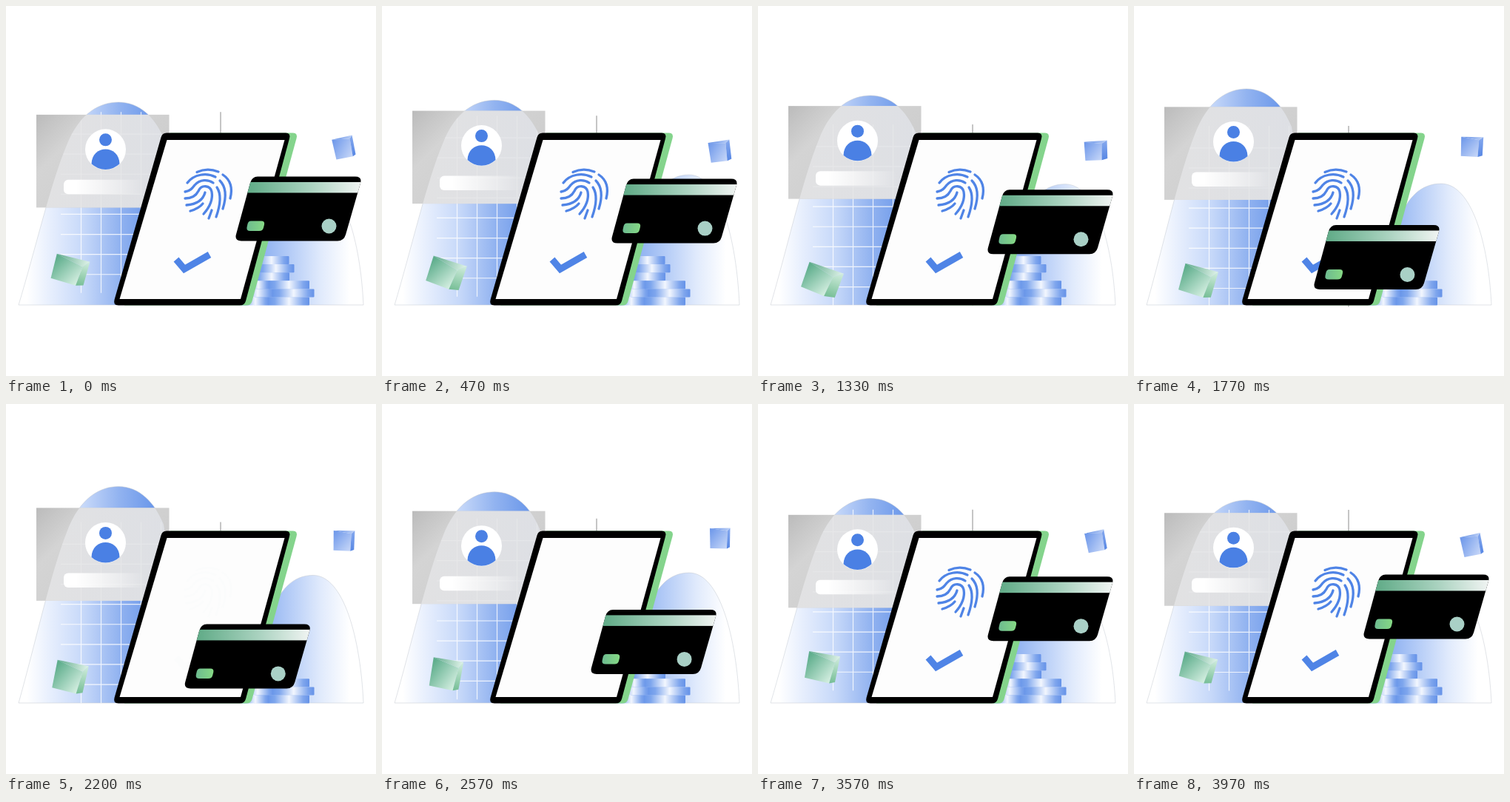
These frames come from a looping animation (500 px wide and 500 px high, 4010 ms). An HTML page:

```html
<!DOCTYPE html>
<html lang="en">
<head>
<meta charset="utf-8">
<title>Secure payment</title>
<style>
  html, body { margin: 0; width: 100%; height: 100%; overflow: hidden; background: #fff; }
  svg { display: block; width: 100vw; height: 100vh; }
  .ridge { fill: none; stroke: #4f84e6; stroke-width: 3.3; stroke-linecap: round; }
  .outline { stroke: #c3c8d0; stroke-width: .5; }
  /* The scan result clears after the tap, then comes back. */
  #scan { animation: scan 4010ms linear infinite; }
  @keyframes scan {
    0%, 52.4% { opacity: 1; }
    54.9%, 69.3% { opacity: 0; }
    72.3%, 100% { opacity: 1; }
  }
</style>
</head>
<body>
<svg viewBox="0 0 500 500">
  <defs>
    <linearGradient id="hillBlue" gradientUnits="userSpaceOnUse" x1="17" x2="200" y1="0" y2="0">
      <stop offset=".06" stop-color="#fff"/>
      <stop offset=".24" stop-color="#e6eefd"/>
      <stop offset=".48" stop-color="#c6d8f9"/>
      <stop offset=".74" stop-color="#92b3f0"/>
      <stop offset="1" stop-color="#6a97ea"/>
    </linearGradient>
    <linearGradient id="hillPale" gradientUnits="userSpaceOnUse" x1="345" x2="478" y1="0" y2="0">
      <stop offset="0" stop-color="#8db0f1"/>
      <stop offset=".3" stop-color="#b6cdf7"/>
      <stop offset=".6" stop-color="#e0eafc"/>
      <stop offset=".9" stop-color="#fff"/>
    </linearGradient>
    <linearGradient id="steel" x1="0" y1="0" x2="1" y2=".7">
      <stop offset="0" stop-color="#b8b8b8"/>
      <stop offset=".12" stop-color="#c3c3c3"/>
      <stop offset=".3" stop-color="#d2d2d2"/>
      <stop offset="1" stop-color="#cacaca"/>
    </linearGradient>
    <linearGradient id="frostFill">
      <stop offset="0" stop-color="#e3e3e4"/>
      <stop offset="1" stop-color="#dfe1e6"/>
    </linearGradient>
    <linearGradient id="barFill">
      <stop offset=".15" stop-color="#fff"/>
      <stop offset="1" stop-color="#fff" stop-opacity="0"/>
    </linearGradient>
    <linearGradient id="coinFill">
      <stop offset="0" stop-color="#6c99ea"/>
      <stop offset=".15" stop-color="#7ea6ed"/>
      <stop offset=".5" stop-color="#f2f6fe"/>
      <stop offset=".85" stop-color="#7fa6ed"/>
      <stop offset="1" stop-color="#6592e8"/>
    </linearGradient>
    <linearGradient id="stripeFill">
      <stop offset=".06" stop-color="#64ad8a"/>
      <stop offset=".55" stop-color="#a9d2bf"/>
      <stop offset="1" stop-color="#f3f5f4"/>
    </linearGradient>
    <linearGradient id="chipFill">
      <stop offset="0" stop-color="#6dbb90"/>
      <stop offset="1" stop-color="#86d985"/>
    </linearGradient>
    <linearGradient id="greenFace" x1="0" y1=".2" x2="1" y2=".8">
      <stop offset="0" stop-color="#5fae8d"/>
      <stop offset="1" stop-color="#d3eee0"/>
    </linearGradient>
    <linearGradient id="greenTop">
      <stop offset="0" stop-color="#5ea98a"/>
      <stop offset="1" stop-color="#e0f3e9"/>
    </linearGradient>
    <linearGradient id="greenSide" x1="0" y1="0" x2="0" y2="1">
      <stop offset="0" stop-color="#d3eedf"/>
      <stop offset="1" stop-color="#74bd94"/>
    </linearGradient>
    <linearGradient id="blueFace" x1="0" y1="0" x2="1" y2="1">
      <stop offset="0" stop-color="#6a95e9"/>
      <stop offset="1" stop-color="#cbdaf9"/>
    </linearGradient>
    <linearGradient id="blueTop">
      <stop offset="0" stop-color="#5a89e4"/>
      <stop offset="1" stop-color="#bfd2f7"/>
    </linearGradient>
    <linearGradient id="blueSide" x1="0" y1="0" x2="0" y2="1">
      <stop offset="0" stop-color="#86a9ee"/>
      <stop offset="1" stop-color="#5787e4"/>
    </linearGradient>
    <path id="hillShape" d="M17 404C40 328 60 240 82 188C100 143 128 130 152 130C180 130 201 150 213 178L250 404Z"/>
    <clipPath id="hillClip"><use class="hill" href="#hillShape"/></clipPath>
    <clipPath id="cardClip"><path id="cardShape" d="M30 0H162Q171.500 0 169 9L149 78.500Q146.500 87 138 87H8Q-1.500 87 1 78L20 8.500Q22.500 0 30 0Z"/></clipPath>
  </defs>

  <use class="hill outline" href="#hillShape" fill="url(#hillBlue)"/>
  <path id="mound" class="outline" d="M335 404C345 315 360 240 415 240C456 240 479 320 483 404Z" fill="url(#hillPale)"/>

  <g class="grid">
    <path id="mesh" fill="none" stroke="#fff" stroke-opacity=".75" stroke-width="1.2"/>
    <path d="M290 0V244.500" stroke="#8c8c8c"/>
  </g>

  <rect class="panel" x="41" width="179.500" height="125.500" fill="url(#steel)" opacity=".96"/>
  <g clip-path="url(#hillClip)">
    <rect class="panel" x="41" width="179.500" height="125.500" fill="url(#frostFill)" opacity=".93"/>
    <!-- The mesh shows faintly through the frosted part. -->
    <g class="grid" opacity=".25"><use href="#mesh"/></g>
  </g>
  <g class="panel">
    <rect x="78" y="88" width="110" height="19.500" rx="6" fill="url(#barFill)"/>
    <circle cx="134.500" cy="47" r="27.500" fill="#fff"/>
    <g fill="#4a80e4">
      <circle cx="134.500" cy="34" r="8.500"/>
      <path d="M115.500 66.500C116 40 153 40 153.500 66.500A27.500 27.500 0 0 1 115.500 66.500Z"/>
    </g>
  </g>

  <g id="coins" fill="url(#coinFill)"></g>

  <path d="M222 171.500H388Q394.500 171.500 392.500 179L332.500 399Q331 404.500 325 404.500H160Z" fill="#84d48c"/>
  <path d="M217 171.500H378Q385 171.500 383 179L324 398.500Q322.500 404.500 316 404.500H152Q144.500 404.500 146.500 397L209.500 177.500Q211 171.500 217 171.500Z"/>
  <path d="M217.500 181H376.500L317 396H153.500Z" fill="#fdfdfd"/>

  <g id="scan">
    <g class="ridge">
      <path d="M258 224.500Q272 218 287 224M293 228C305 236 306 248 303 260"/>
      <path d="M245 239C254 227 271 225 283 231M289 236C298 245 298 258 293 274"/>
      <path d="M242 251C249 250 252 246 255 242C262 234 273 234 280 239M285 245C291 254 290 268 284 285"/>
      <path d="M242 260C252 260 257 256 260 250C264 241 276 242 278 251C280 262 275 272 267 281"/>
      <path d="M244 269C256 268 266 263 269 252"/>
      <path d="M249 277C256 275 262 272 266 267M278 276L274 287"/>
    </g>
    <path d="M230 342.500L241 355.500L275 336" fill="none" stroke="#4f84e6" stroke-width="9"/>
  </g>

  <g id="card">
    <use href="#cardShape"/>
    <g clip-path="url(#cardClip)">
      <rect x="12" y="7.500" width="160" height="14.500" fill="url(#stripeFill)"/>
    </g>
    <path d="M21 60H35Q40 60 39 65L38 69Q37 73.500 32 73.500H20Q14.500 73.500 15.500 68.500L16.500 64Q17.500 60 21 60Z" fill="url(#chipFill)"/>
    <circle cx="126.500" cy="67" r="10" fill="#a9d0c6"/>
  </g>

  <g id="greenCube"></g>
  <g id="blueCube"></g>
</svg>

<script>
const LOOP = 4010;
const SVG = 'http://www.w3.org/2000/svg';
const byId = id => document.getElementById(id);

function add(parent, tag, attrs) {
  const el = document.createElementNS(SVG, tag);
  for (const key in attrs) el.setAttribute(key, attrs[key]);
  return parent.appendChild(el);
}

const move = (el, x, y, rest = '') =>
  el.setAttribute('transform', `translate(${x} ${y})${rest}`);

// Stretches a shape vertically from the ground line.
const stretch = (el, k) => move(el, 0, 404 * (1 - k), ` scale(1 ${k})`);

// Sine around mid that is highest in value at time peak.
const wave = (t, mid, amp, peak, period = LOOP) =>
  mid + amp * Math.cos(2 * Math.PI * (t - peak) / period);

// Smooth looping curve through [time, value] points, without overshoot.
function track(...points) {
  const n = points.length;
  const at = i => {
    const turn = Math.floor(i / n), p = points[i - turn * n];
    return [p[0] + turn * LOOP, p[1]];
  };
  const slope = i => {
    const [a, b] = [at(i), at(i + 1)];
    return (b[1] - a[1]) / (b[0] - a[0]);
  };
  const tangent = i => {
    const a = slope(i - 1), b = slope(i);
    return a * b <= 0 ? 0 : 2 * a * b / (a + b);
  };
  return t => {
    let i = n - 1;
    while (i > 0 && points[i][0] > t) i--;
    const [t0, v0] = at(i), [t1, v1] = at(i + 1);
    const d = t1 - t0, u = (t - t0) / d, w = 1 - u;
    return v0 * w * w * (1 + 2 * u) + v1 * u * u * (3 - 2 * u)
      + d * u * w * (tangent(i) * w - tangent(i + 1) * u);
  };
}

// Tracks with values at the shared pose times.
const POSES = [0, 870, 1330, 1770, 2570, 3170];
const poses = (...values) => track(...values.map((v, i) => [POSES[i], v]));

const hillTop = track([0, 130], [530, 127], [870, 125], [1070, 123.8], [1330, 121],
  [1600, 115], [1770, 112], [2005, 110], [2240, 112], [2410, 115], [2680, 121],
  [2940, 123.8], [3140, 125], [3480, 127]);
const slideX = track([0, 0], [1340, 0], [1770, -67], [1930, -70], [2150, -70], [2570, -28], [3000, 0]);
const slideY = track([0, 0], [1340, 0], [1770, 42.4], [1930, 44], [2150, 44], [2570, 28], [3000, 0]);

// A box in slight perspective: front face, top strip and side strip.
function makeCube(id, tint, pose) {
  const root = byId(id);
  const faces = ['Face', 'Top', 'Side'].map(name =>
    add(root, 'polygon', { fill: `url(#${tint}${name})` }));
  return t => {
    const { x, y, turn, w, h, edge, rim } = pose(t);
    const r = w / 2, b = h / 2;
    const inner = [edge, rim - b], foot = [edge - rim / 3, b + rim / 5];
    const draw = (i, ...xy) => faces[i].setAttribute('points', xy.join(' '));
    draw(0, -r, -b, ...inner, ...foot, -r, b);
    draw(1, -r, -b, r, -b, ...inner);
    draw(2, ...inner, r, -b, r - 1, b - 1, ...foot);
    move(root, x, y, ` rotate(${turn})`);
  };
}

const greenTurn = poses(14, 19, 19, 15, 9, 7.5);
const greenW = poses(46, 48, 49, 46, 41, 40);
const greenH = poses(34, 36, 35.5, 36.7, 38.6, 38.5);
const greenEdge = poses(15, 11, 12, 15, 15, 16);
const blueTurn = poses(-13, -5, -4, 1, -1, -11);
const blueW = poses(28, 30, 31, 30, 27.5, 26);
const blueH = poses(27.5, 26.5, 25.5, 26, 27, 26);
const blueEdge = poses(10, 8, 8, 9, 10, 10);

const greenCube = makeCube('greenCube', 'green', t => ({
  x: 87, y: wave(t, 363.5, 8, 1650), turn: greenTurn(t),
  w: greenW(t), h: greenH(t), edge: greenEdge(t), rim: 9
}));
const blueCube = makeCube('blueCube', 'blue', t => ({
  x: 457, y: wave(t, 189, 8.6, 850), turn: blueTurn(t),
  w: blueW(t), h: blueH(t), edge: blueEdge(t), rim: 4
}));

let mesh = '';
for (let i = 0; i < 8; i++) mesh += `M74 ${29.8 + 27.1 * i}H290`;
for (let i = 0; i < 7; i++) mesh += `M${101.5 + 27 * i} 0V244.5`;
byId('mesh').setAttribute('d', mesh);

// Left edge, right edge and row of each coin, counted from the top.
for (const [left, right, row] of [
  [335, 382.5, 0], [340, 389.5, 1], [335, 383, 2], [325, 357, 3], [318, 362, 4],
  [318, 356, 5], [355, 410, 3], [361, 416.5, 4], [355, 410, 5]
]) add(byId('coins'), 'rect', { x: left, y: 338 + 11.1 * row, width: right - left, height: 11.1, rx: 1 });

const hills = document.querySelectorAll('.hill');
const grids = document.querySelectorAll('.grid');
const panels = document.querySelectorAll('.panel');

function render(t) {
  const hillScale = (404 - hillTop(t)) / 274;
  hills.forEach(el => stretch(el, hillScale));
  stretch(byId('mound'), (404 - wave(t, 235, 7, 1530, LOOP / 2)) / 164);
  const gridY = wave(t, 152.2, 9.8, 1740);
  grids.forEach(el => move(el, 0, gridY));
  const panelY = wave(t, 142.6, 7.5, 3395);
  panels.forEach(el => move(el, 0, panelY));
  move(byId('card'), 310 + slideX(t), wave(t, 242.4, 11.95, LOOP / 2) + slideY(t));
  greenCube(t);
  blueCube(t);
}

function tick() {
  render(performance.now() % LOOP);
  requestAnimationFrame(tick);
}
tick();
</script>
</body>
</html>
```
